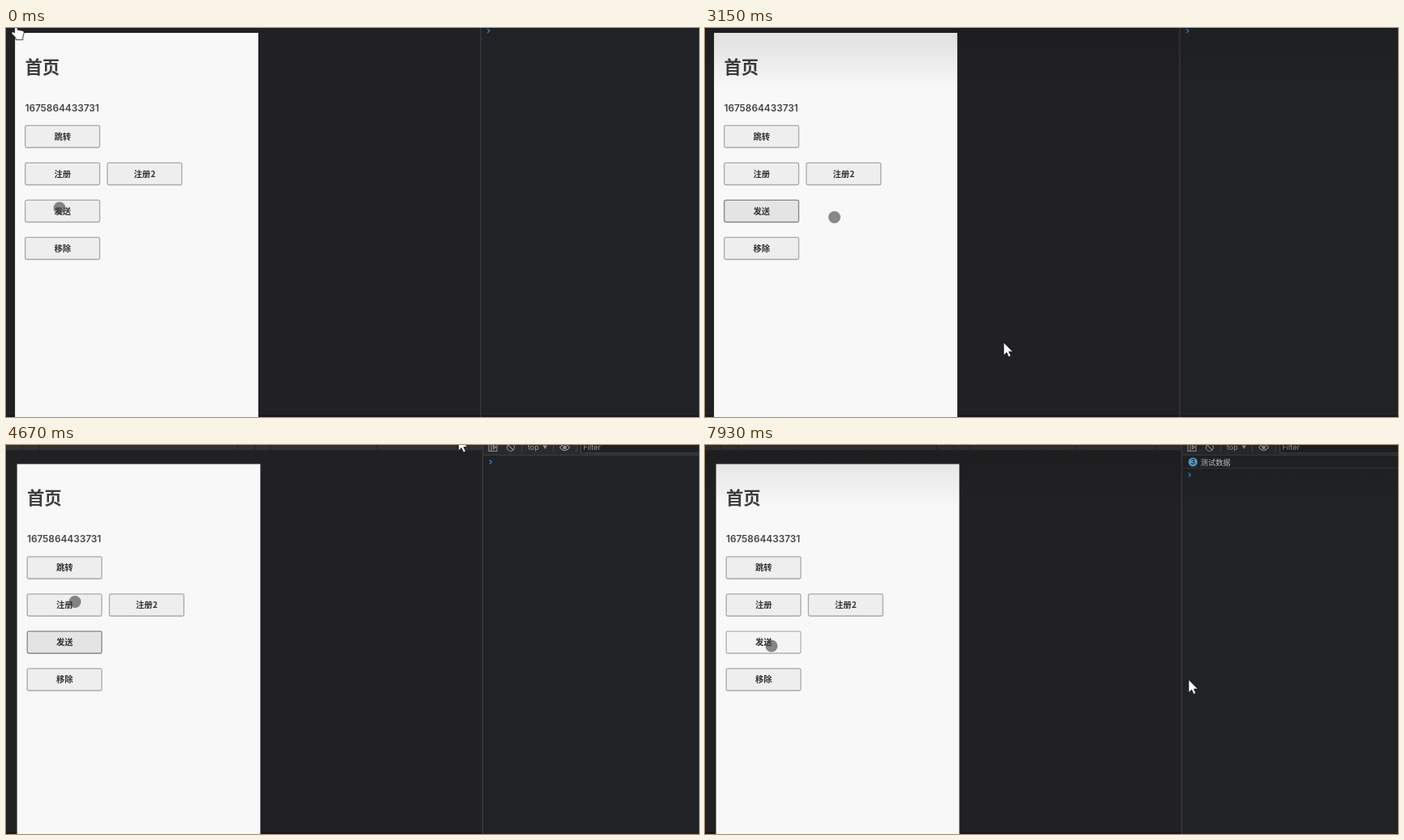
Animation of 854x480 px, one loop 8 s. Source, as an HTML page:

```html
<!DOCTYPE html>
<html lang="zh">
<head>
<meta charset="utf-8">
<title>首页</title>
<style>
  html, body { margin: 0; width: 100%; height: 100%; overflow: hidden; background: #212123; }
  svg { display: block; width: 854px; height: 480px; }
  text { font-family: "Noto Sans CJK SC", "Noto Sans CJK", "Noto Sans", sans-serif; }
  .latin { font-family: Inter, "Liberation Sans", sans-serif; }
  .label { font-size: 10.3px; font-weight: 600; fill: #343434; text-anchor: middle; }
  .tools { fill: none; stroke: #929396; stroke-width: 1.1; }
  .toolText { font-size: 9px; fill: #9b9c9e; }
  .log { font-size: 9.2px; font-weight: 500; fill: #c6c7c9; }
  .normal { fill: #eee; stroke: #a9a9a9; }
  .hover { fill: #e4e4e4; stroke: #868686; }
  .active { fill: #f4f4f4; stroke: #b1b1b1; }
</style>
</head>
<body>
<svg viewBox="0 0 854 480">
  <defs>
    <linearGradient id="fade" x2="0" y2="1">
      <stop offset="0" stop-opacity=".1"/>
      <stop offset=".35" stop-opacity=".07"/>
      <stop offset="1" stop-opacity="0"/>
    </linearGradient>
  </defs>
  <rect width="854" height="480" fill="#212123"/>
  <rect y="477.5" width="854" height="2.5" fill="#1e151b"/>

  <g id="view">
    <rect x="-10" y="-20" width="597" height="26.5" fill="#303235"/>
    <path d="M20 0V6M41 0V6M285.5 0V6M307 0V6M326 0V6M457 0V6M556 0V6" stroke="#202124"/>
    <rect x="13.6" y="23.5" width="299.8" height="490" fill="#f8f8f8"/>
    <text x="26" y="73" font-size="21.3" font-weight="700" fill="#3d3d3d">首页</text>
    <text class="latin" x="25.9" y="120.4" font-size="11.8" font-weight="600" fill="#444">1675864433731</text>
    <g id="buttons" stroke-width="1.3"></g>

    <rect x="588" y="-20" width="280" height="515" fill="#202325"/>
    <rect x="588" y="-20" width="280" height="32" fill="#292b2e"/>
    <rect x="708.5" y="-6" width="160" height="16" fill="#1f2123" stroke="#45474a"/>
    <path d="M588 12.5H868" stroke="#3b3d40"/>
    <path d="M587.5 -20V510" stroke="#3b3c3f" stroke-width="1.3"/>
    <path d="M635.5 -4V9M674.5 -4V9M703 -4V9" stroke="#414347"/>
    <g class="tools">
      <path d="M595-2H605V7.5H595ZM598-2V7.5M600.5 .5L603.5 2.8L600.5 5Z"/>
      <circle cx="622" cy="3" r="4.5"/><path d="M619 0L625 6"/>
      <path d="M682.5 3Q688.5-4.5 694.5 3Q688.5 10.5 682.5 3Z"/>
      <circle cx="688.5" cy="3" r="1.8" fill="#929396"/>
    </g>
    <text class="latin toolText" x="643" y="6">top</text>
    <path d="M661.5 0.5H667L664.2 5Z" fill="#929396"/>
    <text class="latin toolText" x="711.5" y="6.3">Filter</text>

    <g id="log">
      <text id="logText" class="log" y="24.8">测试数据</text>
      <path d="M588 28.5H868" stroke="#34373a"/>
      <g id="badge">
        <circle cx="601.3" cy="21" r="5.6" fill="#5b9fc9"/>
        <text id="count" class="latin" x="601.3" y="24" font-size="8.3" font-weight="600" fill="#20303c" text-anchor="middle"></text>
      </g>
    </g>
    <path id="prompt" d="M595.8 -2.4L598.4 0L595.8 2.4" fill="none" stroke="#3978d2" stroke-width="1.3"/>
  </g>

  <rect id="shade" width="854" height="76" fill="url(#fade)"/>
  <circle id="touch" r="7.5" fill="#3c3c3c" fill-opacity=".6"/>
  <path id="arrow" d="M0 0V16L3.7 12.6L6.2 18L9 16.8L6.5 11.6H11.4Z" fill="#fff" stroke="#151515" stroke-width=".8"/>
  <path id="hand" d="M10.6 6V-3Q12.3-5 14-3V2L20.8 3.5Q22.5 4 22.3 6L20.8 11V14.6H12V12L7 7Q6.6 4.5 8.7 4.6Z" fill="#fff" stroke="#151515" stroke-width=".8"/>
</svg>
<script>
const LOOP = 8000, STEP = 116.6, HOLD = 450;
const PRESSES = [5590, 6850, 7810];
const $ = id => document.getElementById(id);
const within = (t, from, to) => t >= from && t < to;

function ease(t, from, to) {
  const k = Math.min(1, Math.max(0, (t - from) / (to - from)));
  return k * k * (3 - 2 * k);
}

// Each move eases from wherever the last one ended: [begin, end, x, y].
function glide(t, start, ...moves) {
  return moves.reduce(([x, y], [from, to, toX, toY]) => {
    const k = ease(t, from, to);
    return [x + (toX - x) * k, y + (toY - y) * k];
  }, start);
}

const scroll = t => glide(t, [-2.5, -17.5],
  [4190, 4300, -2.5, -11.5],
  [4310, 4660, 0, 0]);

const cursor = t => glide(t, [14, 0],
  [0, 585, 345, 347],
  [820, 1400, 368, 388],
  [3140, 4090, 557.5, -9],
  [6750, 7450, 735, 270],
  [7700, 7925, 596, 289.5]);

const touch = t => glide(t, [66, 222],
  [820, 1400, 57, 227],
  [2100, 2920, 90, 226],
  [2920, 3145, 159.5, 233.5],
  [3740, 4090, 83, 184],
  [4310, 4660, 85, 193.5],
  [4900, 5020, 82, 247],
  [5130, 5830, 82, 252],
  [6750, 7110, 82, 248]);

const boxes = {};
[['跳转'], ['注册', '注册2'], ['发送'], ['移除']].forEach((labels, row) =>
  labels.forEach((label, column) => {
    const x = 26.2 + column * 101.2, y = 137.8 + row * 46;
    $('buttons').insertAdjacentHTML('beforeend',
      `<rect class="normal" x="${x}" y="${y}" width="91.8" height="27.2" rx="1.8"/>
       <text class="label" x="${x + 46}" y="${y + 17.4}">${label}</text>`);
    boxes[label] = $('buttons').querySelector('rect:last-of-type');
  }));

const paint = (label, state) => boxes[label].setAttribute('class', state);
const move = (id, [x, y]) => $(id).setAttribute('transform', `translate(${x} ${y})`);
const show = (id, on) => $(id).setAttribute('visibility', on ? 'visible' : 'hidden');

function render(time) {
  const t = Math.floor((time + 6) / STEP) * STEP;
  move('view', scroll(t));
  move('touch', touch(t));
  move('arrow', cursor(t));
  show('hand', t < STEP);
  show('arrow', t >= STEP);
  show('shade', within(t, 340, 3960) || t > 6850);

  const pressed = PRESSES.some(at => within(t, at, at + HOLD));
  paint('注册', within(t, 4880, 5000) ? 'active' : 'normal');
  paint('发送', t < 1040 ? 'normal' : pressed ? 'active' : 'hover');

  const count = PRESSES.filter(at => t >= at).length;
  show('log', count > 0);
  show('badge', count > 1);
  $('count').textContent = count;
  $('logText').setAttribute('x', count > 1 ? 610.8 : 606.8);
  move('prompt', [0, count ? 36.7 : 21]);
}

function tick() {
  render(performance.now() % LOOP);
  requestAnimationFrame(tick);
}
tick();
</script>
</body>
</html>
```
